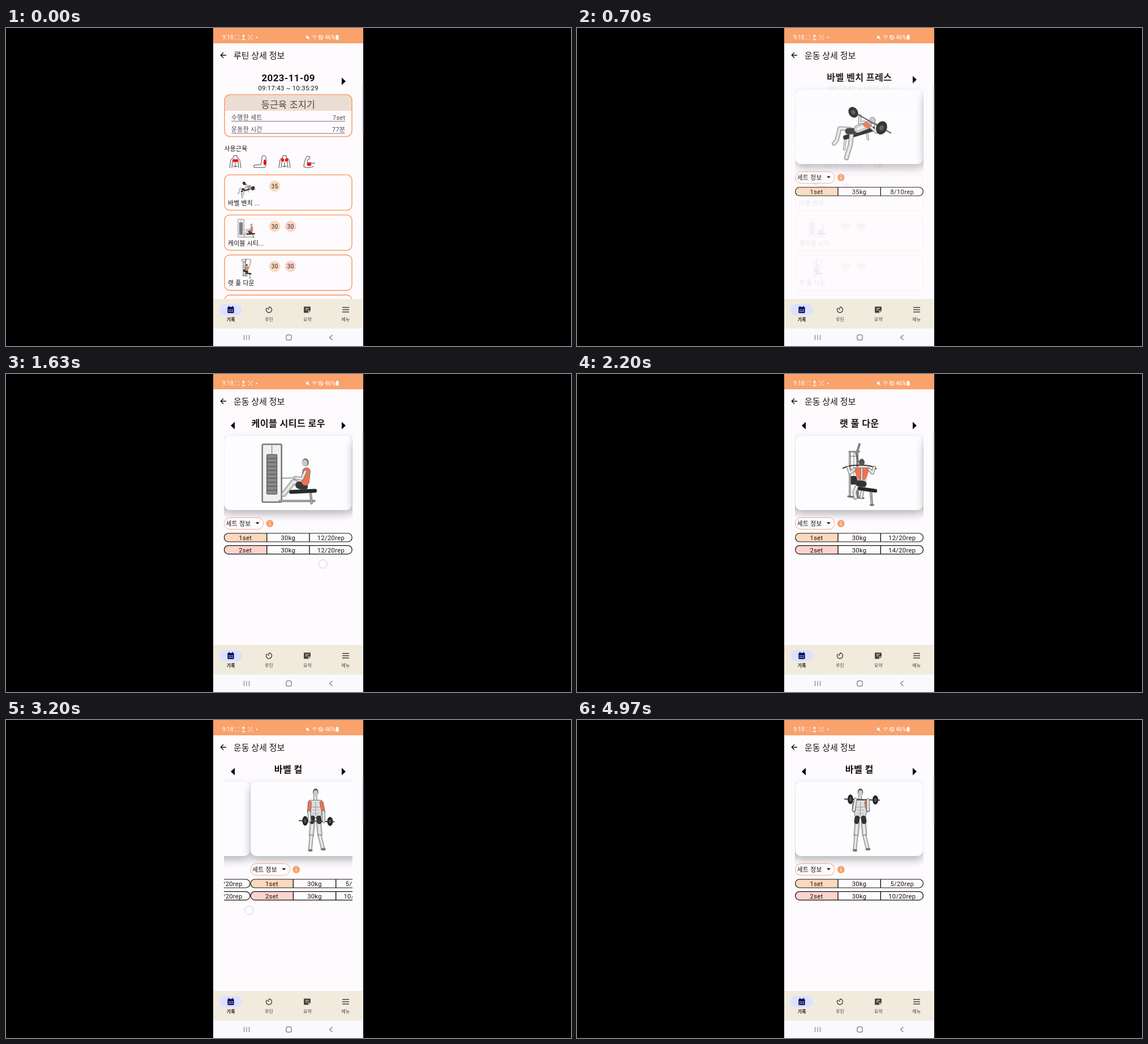
Write an HTML page with a canvas that moves like this. It is 998 by 561 pixels and loops after 5000 ms.

```html
<!DOCTYPE html>
<html lang="ko">
<head>
<meta charset="utf-8">
<style>
html, body { margin: 0; width: 100%; height: 100%; overflow: hidden; background: #000; }
canvas { display: block; }
</style>
</head>
<body>
<canvas id="stage" width="998" height="561"></canvas>
<script>
const screen = document.getElementById('stage').getContext('2d');
const buffer = document.createElement('canvas');
buffer.width = 998;
buffer.height = 561;
const layerCtx = buffer.getContext('2d');
let g = screen;

const ORANGE = '#f9a26c', INK = '#17130f', SKIN = '#c9c9c9', DARK = '#262626', RED = '#ee7250';
const LEFT = 385, PAGE = 227;
const FONT = "Roboto, 'Noto Sans CJK KR', 'Noto Sans CJK', sans-serif";
const clamp = x => Math.max(0, Math.min(1, x));
const ease = x => (x = clamp(x), x < .5 ? 4 * x ** 3 : 1 - 4 * (1 - x) ** 3);
const wave = x => (1 - Math.cos(Math.PI * x)) / 2;

// --- drawing helpers ---
function text(s, x, y, size, { align = 'left', color = INK, weight = 400, gap = .32 } = {}) {
  g.font = `${weight} ${size}px ${FONT}`;
  g.letterSpacing = gap + 'px';
  g.textAlign = align;
  g.fillStyle = color;
  g.fillText(s, x, y + size * .37);
}
function box(x, y, w, h, r, fill, stroke, width = 1) {
  g.beginPath();
  g.roundRect(x, y, w, h, r);
  if (fill) { g.fillStyle = fill; g.fill(); }
  if (stroke) { g.strokeStyle = stroke; g.lineWidth = width; g.stroke(); }
}
function ell(x, y, rx, ry, fill, rot = 0) {
  g.beginPath();
  g.ellipse(x, y, rx, ry, rot, 0, 7);
  g.fillStyle = fill;
  g.fill();
}
function trace(pts) {
  g.beginPath();
  for (let i = 0; i < pts.length; i += 2) g.lineTo(pts[i], pts[i + 1]);
}
function line(width, color, ...pts) {
  trace(pts);
  g.lineWidth = width;
  g.strokeStyle = color;
  g.stroke();
}
function poly(fill, ...pts) {
  trace(pts);
  g.fillStyle = fill;
  g.fill();
}
function limb(width, color, ...pts) {
  g.lineCap = g.lineJoin = 'round';
  line(width + 1.2, '#555', ...pts);
  line(width, color, ...pts);
  if (color === SKIN) line(width * .35, '#f1f1f1', ...pts);
  g.lineCap = 'butt';
  g.lineJoin = 'miter';
}
function shape(d, x, y, stroke, width = 1, fill) {
  g.save();
  g.translate(x, y);
  const p = new Path2D(d);
  if (fill) { g.fillStyle = fill; g.fill(p); }
  if (stroke) { g.strokeStyle = stroke; g.lineWidth = width; g.stroke(p); }
  g.restore();
}
function plate(x, y, rx, ry, rot = 0) {
  ell(x, y, rx, ry, DARK, rot);
  ell(x, y, rx * .4, ry * .4, '#555', rot);
}
function layer(alpha, draw) {
  if (alpha <= 0) return;
  g = layerCtx;
  g.clearRect(0, 0, 998, 561);
  g.save();
  draw();
  g.restore();
  g = screen;
  g.globalAlpha = alpha;
  g.drawImage(buffer, 0, 0);
  g.globalAlpha = 1;
}

// --- exercise figures, u is the pose from 0 to 1 ---
function bench(u) {
  const d = 3 * u;
  limb(3, '#ddd', 474, 196, 472, 214);
  limb(3, '#ddd', 512, 184, 514, 196);
  limb(7, DARK, 474, 193, 524, 178);
  limb(6, SKIN, 482, 178, 464, 177, 459, 198, 454, 204);
  limb(7, SKIN, 485, 187, 483, 206, 478, 222, 476, 229);
  limb(10, '#383838', 479, 182, 490, 182);
  limb(13, SKIN, 496, 178, 514, 171);
  ell(512, 171, 8, 5, RED, .5);
  ell(522, 163, 5.5, 6, '#666');
  ell(522, 163, 4.7, 5.2, SKIN);
  limb(4, SKIN, 507, 166, 499, 167, 500, 154 + d);
  limb(4, SKIN, 519, 175, 529, 184, 527, 169 + d);
  line(2.2, '#555', 481, 143 + d, 555, 184.5 + d);
  plate(488, 147.5 + d, 8, 10, -.6);
  plate(538, 175 + d, 9.5, 12, .4);
}
function cable(u) {
  const h = 500 + 12 * u;
  box(453, 124, 34, 102, 2, '#f0f0f0', '#777', 2.5);
  box(461, 142, 18, 70, 1, '#8a8a8a', '#444', 1);
  for (let y = 149; y < 210; y += 7) line(1, '#444', 461, y, 479, y);
  line(1, '#666', 470, 126, 470, 142);
  limb(3, '#aaa', 484, 224, 545, 224);
  limb(3, '#aaa', 538, 207, 540, 228);
  limb(6, DARK, 504, 208, 546, 206);
  limb(8, SKIN, 528, 198, 508, 190, 491, 212);
  limb(12, '#383838', 527, 199, 518, 196);
  limb(13, RED, 529, 190, 531, 172);
  ell(529, 156, 6, 7, '#666');
  ell(528, 157, 5, 6, SKIN);
  line(1, '#555', 486, 184, h, 183);
  limb(5, SKIN, 529, 172, 517 + 6 * u, 185, h, 183);
}
function lat(u) {
  const b = 125 + 46 * u, e = 150 + 30 * u;
  limb(2, '#aaa', 482, 137, 482, 215);
  limb(2.5, '#888', 499, 124, 495, 137, 496, 216);
  limb(1.5, '#999', 481, 137, 499, 137);
  line(1, '#666', 482, 145, 496, 145);
  line(1, '#777', 489, 138, 489, 180);
  box(483.5, 180, 13, 15, 1, '#333');
  limb(2, '#777', 479, 216, 506, 219);
  line(1, '#444', 491, 138, 500, b - 2);
  limb(6, SKIN, 496, 196, 490, 208, 492, 218);
  limb(5, SKIN, 506, 197, 502, 217);
  limb(3, '#aaa', 519, 206, 521, 231);
  line(2, '#666', 517, 231, 525, 231);
  poly(SKIN, 489, 164, 516, 164, 511, 190, 496, 190);
  poly(RED, 488, 165, 517, 165, 513, 179, 508, 187, 498, 187, 493, 179);
  limb(2.5, '#e8e8e8', 503, 167, 503, 187);
  limb(10, '#333', 498, 193, 506, 194);
  limb(5.5, DARK, 499, 202, 527, 206);
  shape(`M469 ${b + 4}Q478 ${b - 2} 500 ${b - 2}T529 ${b + 5}`, 0, 0, '#333', 2);
  for (const s of [-1, 1]) limb(4.5, SKIN, 503 + 13 * s, 168, 502 + 20 * s, e, 502 + 23 * s, b + 2);
  ell(503, 156, 5, 6.5, '#555');
}
function curl(u) {
  const y = 178 - 38 * u;
  limb(7.5, SKIN, 495, 181, 493, 203);
  limb(5.5, SKIN, 493, 205, 491, 227);
  limb(7.5, SKIN, 506, 181, 508, 202);
  limb(5.5, SKIN, 508, 205, 513, 225);
  ell(491, 230, 4, 2.2, '#777');
  ell(514, 228, 4.5, 2.2, '#777');
  limb(5, SKIN, 500, 133, 500, 140);
  poly('#777', 489, 141, 511, 141, 514, 150, 510, 173, 491, 173, 487, 150);
  poly('#dedede', 490, 142, 511, 142, 513, 150, 509, 172, 492, 172, 488, 150);
  line(.8, '#888', 500.5, 144, 500.5, 170);
  line(.8, '#888', 491, 153, 500, 154, 510, 153);
  line(.6, '#999', 494, 159, 507, 159);
  line(.6, '#999', 494, 165, 507, 165);
  limb(8, '#333', 495, 173, 494, 179);
  limb(8, '#333', 506, 173, 507, 179);
  ell(500.5, 127.5, 4.8, 6.5, '#444');
  ell(500.5, 129, 4, 5.5, SKIN);
  limb(5.5, RED, 490, 146, 489, 162 - 3 * u);
  limb(5.5, RED, 511, 146, 514, 162 - 3 * u);
  line(2, '#444', 471 + u, y - .5, 534 + u, y + 1.5);
  limb(4.5, SKIN, 489, 162 - 3 * u, 490 + 2 * u, y);
  limb(4.5, SKIN, 514, 162 - 3 * u, 515 - u, y + 1);
  plate(482 + u, y, 5, 8.5);
  plate(526 + u, y + 1, 5, 8);
}

const exercises = [
  { name: '바벨 벤치 프레스', label: '바벨 벤치 ...', draw: bench, kg: 35, reps: ['8/10'], pose: t => wave(clamp((t - 430) / 640)) },
  { name: '케이블 시티드 로우', label: '케이블 시티...', draw: cable, kg: 30, reps: ['12/20', '12/20'], pose: t => wave((t - 1000) / 700) },
  { name: '랫 풀 다운', label: '랫 풀 다운', draw: lat, kg: 30, reps: ['12/20', '14/20'], pose: t => wave((t - 1050) / 1600) },
  { name: '바벨 컬', label: '바벨 컬', draw: curl, kg: 30, reps: ['5/20', '10/20'], pose: t => wave(clamp((t - 3150) / 1600)) }
];
const TINTS = ['#fbd9bd', '#fbd4cc'];

// --- motion ---
const swipes = [[900, 479, 334], [1600, 560, 335], [2918, 610, 336]];
const scroll = t => swipes.reduce((sum, [t0]) => sum + ease((t - t0) / 450), 0);
function fade(t) {
  const p = clamp((t - 180) / 700) ** .68;
  return p * p * (3 - 2 * p);
}
function stretch(t) {
  const d = t - 3960;
  return d < 0 ? 0 : d < 160 ? 6 * d / 160 : 6 * Math.exp((160 - d) / 120);
}

// --- screens ---
function arrow(x, y, dir) {
  poly('#000', x - 3.5 * dir, y - 6.5, x - 3.5 * dir, y + 6.5, x + 3.5 * dir, y);
}
function muscles() {
  const torso = 'M-10 11L-8 -3Q-7 -6 -3 -7V-11H3V-7Q7 -6 8 -3L10 11M-6 11L-5 0M6 11L5 0M-4 8H4M0 1V10';
  const y = 236;
  shape(torso, 405, y, '#333', .9);
  box(400, 231.5, 10.5, 5, 1, '#e11');
  shape('M3 -8a3.5 3.5 0 0 1 7 1Q12 6 8 10H-11V6L1 5Q3 0 3 -8', 449, y, '#333', .9);
  ell(457, 237, 2.2, 5, '#e11');
  shape(torso, 492, y, '#333', .9);
  ell(488.5, 233, 2.8, 3, '#e11');
  ell(495.5, 233, 2.8, 3, '#e11');
  shape('M-9 9Q-8 -4 -3 -10L2 -9L1 -5L-2 -4Q-3 0 -3 3Q3 -1 6 3L11 2M-9 9Q0 12 9 8', 535, y, '#333', .9);
  ell(535.5, 240.5, 4, 3, '#e11');
}
function listScreen() {
  const mid = { align: 'center' };
  text('2023-11-09', 498.7, 88, 17, { ...mid, weight: 700 });
  text('09:17:43 ~ 10:35:29', 498.7, 106, 11.3, mid);
  arrow(596.5, 94, 1);
  box(386, 117.5, 225, 74, 10, '#fefbff');
  box(386, 117.5, 225, 28.5, [10, 10, 0, 0], '#ecddd3');
  box(386, 117.5, 225, 74, 10, null, ORANGE, 1.6);
  text('등근육 조지기', 498.5, 135, 16.2, { ...mid, color: '#52443c' });
  [['수행한 세트', '7set'], ['운동한 시간', '77분']].forEach(([a, b], i) => {
    const y = 157.5 + 21.5 * i;
    text(a, 398, y, 10.9, { color: '#51453e' });
    text(b, 599.3, y, 10.9, { align: 'right', color: '#51453e' });
    line(1, '#77728a', 398, y + 7, 599, y + 7);
  });
  text('사용근육', 385.5, 213.5, 10.8);
  muscles();
  exercises.forEach((ex, i) => {
    const y = 259 + 70.7 * i;
    box(386, y, 225, 62.5, 9, '#fefbff', ORANGE, 1.6);
    g.save();
    g.translate(425, y + 25.5);
    g.scale(.31, .31);
    g.translate(-502, -181);
    ex.draw(0);
    g.restore();
    text(ex.label, 392, y + 50, 10.8);
    ex.reps.forEach((_, k) => {
      ell(474.5 + 28 * k, y + 20, 10, 10, TINTS[k]);
      text(ex.kg, 474.7 + 28 * k, y + 20.3, 10, { ...mid, color: '#2b211b' });
    });
  });
}
function page(ex, x, t) {
  g.shadowColor = 'rgba(0,0,0,.28)';
  g.shadowBlur = 15;
  g.shadowOffsetY = 7;
  box(x + .5, 109, 226, 131, 11, '#fdfdff');
  g.shadowColor = 'transparent';
  g.save();
  g.translate(x - LEFT, 0);
  ex.draw(ex.pose(t));
  box(385.5, 253.5, 69.5, 20.5, 10, '#fefbff', '#f1a88a');
  text('세트 정보', 388.7, 264, 10.8);
  poly('#111', 441, 261.5, 448, 261.5, 444.5, 265);
  ell(466.3, 263.8, 6.5, 6.5, '#f6a26e');
  line(1.2, '#fff', 466.3, 263, 466.3, 267);
  line(1.2, '#fff', 466.3, 260.3, 466.3, 261.6);
  ex.reps.forEach((rep, i) => {
    const y = 281 + 21.6 * i;
    box(385.5, y, 75.5, 15, [7.5, 0, 0, 7.5], TINTS[i]);
    box(385.7, y, 225.8, 15, 7.5, null, '#111', 1.2);
    for (const d of [461, 536.3]) line(1.4, '#111', d, y, d, y + 15);
    [`${i + 1}set`, `${ex.kg}kg`, `${rep}rep`].forEach((s, k) =>
      text(s, 423 + 75.6 * k, y + 7.8, 11.2, { align: 'center' }));
  });
  g.restore();
}
function detailScreen(t) {
  const pos = scroll(t), current = Math.round(pos);
  text(exercises[current].name, 498.8, 87.5, 16.2, { align: 'center', weight: 700 });
  if (current) arrow(400.5, 91, -1);
  arrow(596.5, 91, 1);
  g.beginPath();
  g.rect(LEFT, 100, PAGE, 378);
  g.clip();
  g.translate(LEFT + PAGE, 0);
  g.scale(1 + stretch(t) / PAGE, 1);
  g.translate(-LEFT - PAGE, 0);
  exercises.forEach((ex, i) => {
    if (Math.abs(i - pos) < 1.1) page(ex, LEFT + (i - pos) * PAGE, t);
  });
}
function finger(t) {
  const dot = (x, y) => {
    ell(x, y, 7.5, 7.5, 'rgba(255,255,255,.6)');
    g.strokeStyle = 'rgba(120,90,100,.4)';
    g.lineWidth = .8;
    g.stroke();
  };
  for (const [t0, x, y] of swipes)
    if (t > t0 && t < t0 + 300) dot(x - PAGE * ease((t - t0) / 450), y);
  if (t > 3930 && t < 4130) dot(480 - .62 * (t - 3930), 342);
}

function statusBar() {
  const w = '#fff';
  box(366, 0, 265, 27, 0, ORANGE);
  text('9:18', 382, 16.3, 10.3, { color: w, gap: 0 });
  const corners = 'M-3.5 -1.5V-3.5H-1.5M1.5 -3.5H3.5V-1.5M3.5 1.5V3.5H1.5M-1.5 3.5H-3.5V1.5';
  shape(corners, 408, 16.5, 'rgba(255,255,255,.65)', .8);
  shape('M0 2V-4M-2.3 -1.7L0 -4L2.3 -1.7M-3 4H3', 419.5, 16.5, w, 1.3);
  shape(corners + 'M-2 -2L2 2M2 -2L-2 2', 431.5, 16.5, 'rgba(255,255,255,.85)', .8);
  ell(443, 16.5, 1.2, 1.2, w);
  shape('M-3 -1.5H-1L1.5 -3.5V3.5L-1 1.5H-3Z', 533, 16.5, null, 0, w);
  shape('M-3.5 -3.5L3.5 3.5', 533, 16.5, w);
  shape('M-4 -1.5Q0 -5 4 -1.5M-2.3 .6Q0 -1.5 2.3 .6M0 2V3.5', 545, 16.5, 'rgba(255,255,255,.8)', 1.1);
  shape('M3.5 0A3.5 3.5 0 1 1 -3.5 0A3.5 3.5 0 1 1 3.5 0M-2.5 -2.5L2.5 2.5', 556, 16.5, w, 1.1);
  text('46%', 563, 16.5, 10, { color: w, gap: 0 });
  box(582.5, 13, 5, 7.5, 1, w);
  box(584, 12, 2, 1.5, 0, w);
}
function navBar() {
  box(366, 478, 265, 52, 0, '#f1ebdd');
  box(377, 487, 40, 20, 10, '#dde1ff');
  const ink = '#4b4039', navy = '#0b1361';
  box(391.3, 492, 11.4, 11, 1.5, navy);
  box(393, 490.5, 1.6, 3, 0, navy);
  box(399.4, 490.5, 1.6, 3, 0, navy);
  for (let i = 0; i < 6; i++) box(393.2 + 2.9 * (i % 3), 496.6 + 2.8 * (i / 3 | 0), 1.7, 1.5, 0, '#dde1ff');
  shape('M0 -5A5 5 0 1 1 -4 -3M0 -5V-2.5M0 0L-3 -3', 464.5, 497, ink, 1.4);
  shape('M-5 -5.5H5Q6 -5.5 6 -4.5V2L2.5 5.5H-5Q-6 5.5 -6 4.5V-4.5Q-6 -5.5 -5 -5.5Z', 532, 497, null, 0, ink);
  shape('M-3.2 -2.3H3.2M-3.2 .3H.5M2.3 5V2H5.4', 532, 497, '#f1ebdd', 1.1);
  shape('M-6 -4H6M-6 0H6M-6 4H6', 600, 497, ink, 1.4);
  ['기록', '루틴', '요약', '메뉴'].forEach((s, i) =>
    text(s, 397.2 + 67.6 * i, 514.5, 7.9, { align: 'center', weight: i ? 500 : 700, color: i ? ink : INK, gap: .2 }));
  box(366, 530, 265, 31, 0, '#faf9fd');
  shape('M-4.5 -4.5V4.5M0 -4.5V4.5M4.5 -4.5V4.5', 425, 546, '#777', 1.1);
  box(494.8, 541.3, 9.4, 9.4, 3, null, '#777', 1.2);
  shape('M2.5 -4.5L-2.5 0L2.5 4.5', 574, 546, '#777', 1.2);
}

function frame(now) {
  const t = now % 5000, p = fade(t);
  g = screen;
  box(0, 0, 998, 561, 0, '#000');
  box(366, 0, 265, 561, 0, '#fefbff');
  layer(1 - p, listScreen);
  layer(p, () => detailScreen(t));
  finger(t);
  statusBar();
  shape('M5 0H-4.5M0 -4.7L-4.7 0L0 4.7', 384, 48, '#111', 1.4);
  text(t < 180 ? '루틴 상세 정보' : '운동 상세 정보', 402, 48.5, 15, { gap: 0 });
  box(628.8, 101, 2.4, 86, 1.2, '#dcdbe0');
  navBar();
  requestAnimationFrame(frame);
}
requestAnimationFrame(frame);
</script>
</body>
</html>
```
